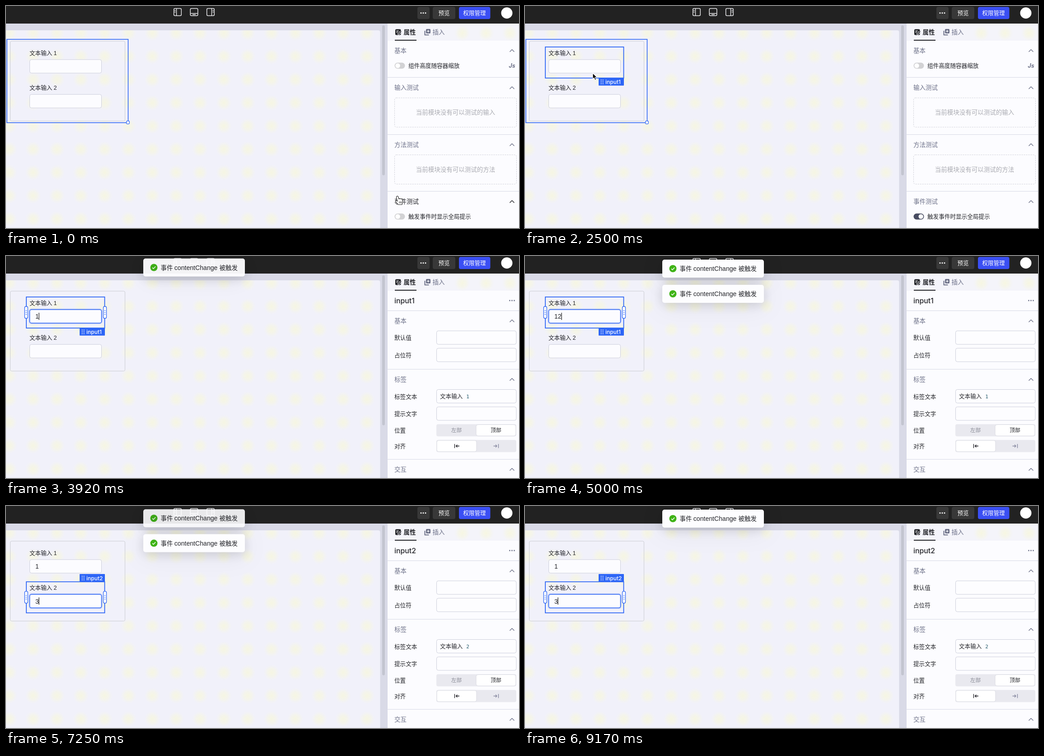
Write an HTML page that moves like this. It is 1136 px wide and 493 px high and loops after 9.33 s.

```html
<!DOCTYPE html>
<html lang="zh-CN">
<head>
<meta charset="utf-8">
<title>事件测试</title>
<style>
html, body { margin: 0; width: 100%; height: 100%; overflow: hidden; background: #d9dae7; }
svg { display: block; }
text { font-family: "Liberation Sans", "Noto Sans CJK SC", "Noto Sans CJK", sans-serif; white-space: pre; }
.ui { font-family: Inter, "Noto Sans CJK SC", "Noto Sans CJK", sans-serif; font-weight: 500; }
.mono { font-family: "DejaVu Sans Mono", "Noto Sans Mono", monospace; }
.toast { filter: drop-shadow(0 5px 12px #0002) drop-shadow(0 8px 26px #0001); }
</style>
</head>
<body>
<svg id="stage" width="1136" height="493" viewBox="0 0 1136 493"></svg>
<script>
const LOOP = 9330, STEP = 1000 / 12;
const BLUE = '#2e66f6', GREY = '#6d7189', INK = '#222328', LINE = '#d6d8e4', FIELD = '#cdcfdb';

// Markup helpers; text y is the vertical centre of the line.
const rect = (x, y, w, h, r, fill, stroke = 'none', more = '') =>
  `<rect x="${x}" y="${y}" width="${w}" height="${h}" rx="${r}" fill="${fill}" stroke="${stroke}" ${more}/>`;
const text = (x, y, size, fill, str, more = '') =>
  `<text x="${x}" y="${y + size * 0.37}" font-size="${size}" fill="${fill}" ${more}>${str}</text>`;
const path = (d, stroke, width = 1.4, fill = 'none', more = '') =>
  `<path d="${d}" stroke="${stroke}" stroke-width="${width}" fill="${fill}" stroke-linejoin="round" ${more}/>`;
const disc = (x, y, r, fill, more = '') => `<circle cx="${x}" cy="${y}" r="${r}" fill="${fill}" ${more}/>`;
const group = (id, body, more = '') => `<g id="${id}" ${more}>${body}</g>`;
const dots = (x, y, gap, r, fill) => [-gap, 0, gap].map(d => disc(x + d, y, r, fill)).join('');
const MID = 'text-anchor="middle"', MEDIUM = 'font-weight="500"';

const divider = y => rect(845, y, 291, 1, 0, LINE);
const heading = (y, str, color = GREY) =>
  text(860, y, 13.5, color, str, MEDIUM) + path(`M1115.5 ${y + 2.7}l5-5 5 5`, color);
const label = (x, y, str) => text(x, y, 12.6, INK, str);
const dashed = (y, str) =>
  rect(860.5, y, 270, 65, 4, 'none', '#d0d1d9', 'stroke-dasharray="3 2"') +
  text(995.5, y + 32.5, 13.5, '#aaabb2', str, MID);
const toggle = (y, id) =>
  rect(860.5, y - 6.5, 23, 13.5, 6.75, '#d2d2d4', 'none', `id="${id}Track"`) +
  disc(867.5, y + 0.2, 5.2, '#fff', `id="${id}Knob"`);
const field = (y, str) => label(860, y, str) + rect(953.5, y - 15.5, 176.5, 30, 4, '#fdfdff', FIELD);
const segment = (y, str, x) => label(860, y, str) + rect(953, y - 13.5, 177, 27, 4, '#e9e9ef') +
  rect(x, y - 12.5, 88, 25, 4, '#fff', '#d9dae2');

const layoutIcon = (x, split) =>
  rect(x - 8.3, 5.5, 16.6, 16, 2.5, 'none', '#e9e9ec', 'stroke-width="1.5"') + path(split, '#e9e9ec', 1.5);

function topBar() {
  return rect(0, 0, 1136, 39, 0, '#222') +
    layoutIcon(380, 'M377.5 5.5v16M373 10h2.5M373 13.5h2.5') +
    layoutIcon(416.5, 'M408.5 16.5h16M413 19h7') +
    layoutIcon(453, 'M455.5 5.5v16M457.5 10h2.5M457.5 13.5h2.5') +
    rect(911, 2, 27, 27, 4, '#383838') + dots(924, 15.5, 5, 1.5, '#fff') +
    rect(945, 2, 50, 27, 4, '#383838') + text(970, 15.5, 12.6, '#fff', '预览', MID) +
    rect(1003, 2, 69.5, 27, 4, '#3a4ff4') + text(1037.5, 15.5, 12.6, '#fff', '权限管理', MID) +
    disc(1109, 15.5, 12.5, '#fff');
}

function canvasArea() {
  return rect(0, 39, 845, 454, 0, '#d9dae7') +
    path('M0 54H824Q828.5 54 828.5 58V493H0Z', 'none', 0, '#f1f1fa') +
    path('M0 54H828V493H0Z', 'none', 0, 'url(#spots)') +
    rect(833, 43, 6, 333, 3, '#c3c5d0');
}

function tabs() {
  return rect(845, 39, 291, 454, 0, '#fcfcff') + rect(845, 39, 291, 38, 0, '#f4f4fa') +
    rect(985, 39, 151, 38, 0, 'url(#spots)') +
    rect(862, 51.5, 12.5, 13, 2.5, INK) + path('M864.5 55.5h5M864.5 58.5h3', '#fff', 1.3) +
    path('M868 63.5l6.5-6.5', '#f4f4fa', 4) + path('M868.5 63l6.5-6.5', INK, 2) +
    text(880.5, 58, 13.5, INK, '属性', 'font-weight="700"') + rect(861, 75, 48, 2, 0, INK) +
    path('M927.5 55v9.2h9', GREY, 2) + rect(930, 51, 10, 10, 2, GREY) +
    path('M935 53.3v5.4M932.3 56h5.4', '#fff', 1.3) + text(944.5, 58, 13.5, GREY, '插入', MEDIUM);
}

function modulePanel() {
  return heading(99, '基本') + toggle(132.3, 'fit') + label(891, 132.3, '组件高度随容器缩放') +
    text(1113.5, 132, 12.5, GREY, 'Js', 'class="ui" font-style="italic" style="font-weight:700"') +
    divider(158) + heading(181.5, '输入测试') + dashed(204, '当前模块没有可以测试的输入') +
    divider(285) + heading(308, '方法测试') + dashed(330.5, '当前模块没有可以测试的方法') +
    divider(411) + group('eventOff', heading(434.3, '事件测试')) +
    group('eventOn', heading(434.3, '事件测试', INK)) +
    toggle(467.3, 'tip') + label(891, 467.3, '触发事件时显示全局提示');
}

function inputPanel() {
  return text(860, 99.5, 15.8, INK, '', 'class="ui" id="title"') + dots(1120.5, 99, 5, 1.4, GREY) +
    divider(121) + heading(144, '基本') + field(181.7, '默认值') + field(220.3, '占位符') +
    divider(251) + heading(274, '标签') + field(312, '标签文本') + label(961, 311.5, '文本输入') +
    text(1019.3, 312, 11, '#20586a', '', 'class="mono" id="labelNo"') + field(350.5, '提示文字') +
    segment(387, '位置', 1041) + text(997.5, 387, 11.8, '#8b8d98', '左部', MID) +
    text(1085, 387, 11.8, INK, '顶部', MID + ' ' + MEDIUM) + segment(422, '对齐', 954) +
    path('M993.5 417.5v9M1004 422h-7.5m3-3l-3 3 3 3', INK) +
    path('M1090.5 417.5v9M1079.5 422h7.5m-3-3l3 3-3 3', '#8688a0') +
    divider(451) + group('actOff', heading(473.7, '交互')) + group('actOn', heading(473.7, '交互', INK));
}

// One form input with its focus ring, hover frame, name tag and side handles.
function formInput(n, y) {
  return text(52, y - 29.7, 12.6, INK, '文本输入') + text(105.6, y - 29.7, 12.6, INK, n) +
    rect(52.5, y - 15, 159, 30, 4, '#fcfcff', FIELD) +
    group('focus' + n, rect(51.5, y - 16, 161, 32, 5, 'none', '#2e66f633', 'stroke-width="3"') +
      rect(52.5, y - 15, 159, 30, 4, '#fcfcff', BLUE, 'stroke-width="1.5"')) +
    text(65, y + 0.2, 13.8, INK, '', `id="value${n}"`);
}
function inputFrame(n, y, tagY) {
  const grip = [0, 1, 2].map(i => disc(168.7, tagY + 5 + i * 4, 1, '#fff') + disc(172.7, tagY + 5 + i * 4, 1, '#fff')).join('');
  const handle = x => rect(x, y - 22, 7, 26.5, 3, '#fff', BLUE, 'stroke-width="1.3"') +
    path(`M${x + 2} ${y - 12.5}h3m-3 4h3m-3 4h3`, BLUE, 1.1);
  return group('frame' + n, rect(45, y - 43, 173.5, 69, 0, 'none', BLUE, 'stroke-width="1.8"') +
    rect(163, tagY, 56, 17.3, 1, BLUE) + grip +
    text(178, tagY + 9.2, 12, '#fff', 'input' + n, 'class="ui"')) +
    group('handles' + n, handle(41.3) + handle(215.5));
}

function toast(i) {
  return group('toast' + i, rect(304, 0, 225, 40, 5, '#fdfdff') + disc(327.5, 20, 8, '#3fb317') +
    path('M324 20.2l2.5 2.5 4.6-5', '#fff', 1.5) + text(342.5, 20, 13.5, INK, '事件') +
    text(372.8, 20, 14.1, INK, 'contentChange') + text(472.6, 20, 13.5, INK, '被触发'), 'class="toast"');
}

const toasts = [[3750, 6790], [4060, 7165], [5500, 8500], [7250, Infinity]];

stage.innerHTML = `<defs>
  <radialGradient id="spot"><stop offset="0" stop-color="#f6f6de" stop-opacity=".85"/>
  <stop offset=".5" stop-color="#f6f6e2" stop-opacity=".6"/><stop offset="1" stop-color="#f5f5ee" stop-opacity="0"/></radialGradient>
  <pattern id="spots" x="33.6" y="189.2" width="52.8" height="51.6" patternUnits="userSpaceOnUse">
  ${disc(26.4, 25.8, 18, 'url(#spot)')}</pattern></defs>` +
  canvasArea() + rect(9.5, 78, 254, 177.5, 3, 'none', '#cbccd2') +
  formInput(1, 134) + formInput(2, 211.3) +
  group('module', rect(2, 74, 268.5, 185.2, 0, 'none', BLUE, 'stroke-width="1.6"') +
    rect(266.7, 255.3, 6.5, 6.5, 1.5, '#fff', BLUE, 'stroke-width="1.3"')) +
  inputFrame(1, 134, 159.5) + inputFrame(2, 211.3, 151) +
  rect(0, 0, 1.2, 16, 0, '#111', 'none', 'id="caret"') +
  tabs() + group('panelModule', modulePanel()) + group('panelInput', inputPanel()) +
  topBar() + toasts.map((_, i) => toast(i)).join('') +
  group('cursor',
    group('hand', path('M-2 0Q0-2 1.3 0L3 5.5Q4.5 4 6 5.2 7.5 4.2 8.7 5.7 10.5 5.3 11 7.5L11.5 12 10 18H1.5L-4.5 11Q-5.5 8.5-3 8.7L-.3 10.5-2.7 2Z', '#222', 1.1, '#fff') +
      path('M4 11v4M6.3 11v4M8.5 11v4', '#222', 0.9)) +
    group('arrow', path('M0 0V13.2L3 10.4 5.3 15.6 7.7 14.5 5.4 9.5H9.5Z', '#fff', 1.1, '#000')) +
    group('beam', path('M-3-6.5Q0-6.5 0-4.5 0-6.5 3-6.5M0-5V6M-3 7.5Q0 7.5 0 5.5 0 7.5 3 7.5M-1.5 2h3', '#111', 1.2)));

const $ = id => document.getElementById(id);
const show = (id, on) => $(id).style.display = on ? '' : 'none';
const within = (t, a, b) => t >= a && t < b;
const clamp = v => Math.max(0, Math.min(1, v));
const mix = (a, b, p) => a + (b - a) * p;
const easeOut = p => 1 - (1 - p) ** 4;
const easeInOut = p => p < 0.5 ? 4 * p ** 3 : 1 - 4 * (1 - p) ** 3;
const latest = (list, t) => list.findLast(e => t >= e[0]) || [];

// time, x, centre y; an entry without a place hides the caret
const carets = [[3000, 65, 134], [3500], [3750, 73, 134], [4000, 81, 134], [4500], [5000, 81, 134],
  [5500, 73, 134], [6000], [6660, 65, 211], [7160, 73, 211], [7660], [8160, 73, 211], [8660], [9160, 73, 211]];
const values1 = [[0, ''], [3750, '1'], [4000, '12'], [5500, '1']];
const track = [[0, 867, 423], [83, 872, 441], [250, 874, 460], [417, 875, 463], [917, 875, 463], [1833, 356, 236],
  [2000, 356, 236], [2500, 150, 149], [2833, 136, 134], [6080, 136, 134], [6500, 134, 200], [6750, 134, 207],
  [7750, 134, 207], [8000, 553, 230], [8167, 598, 236], [8333, 598, 236], [8833, 875, 460], [9330, 875, 460]];

function moveCursor(t) {
  show('cursor', t < 3750 || within(t, 6160, 7160) || within(t, 7825, 8910));
  const kind = t < 1000 || t >= 8750 ? 'hand' : within(t, 2660, 7160) ? 'beam' : 'arrow';
  for (const k of ['hand', 'arrow', 'beam']) show(k, k === kind);
  const i = track.findIndex(p => p[0] > t), a = track[i - 1], b = track[i];
  let p = (t - a[0]) / (b[0] - a[0]);
  p = p * p * (3 - 2 * p);
  $('cursor').setAttribute('transform', `translate(${mix(a[1], b[1], p)} ${mix(a[2], b[2], p)})`);
}

function stackToasts(t) {
  let y = 0;
  toasts.forEach(([start, end], i) => {
    const e = easeOut(clamp((t - start) / 300)), left = 1 - easeInOut(clamp((t - end) / 300));
    const alive = t > start && left > 0;
    show('toast' + i, alive);
    if (!alive) return;
    const pad = 8 * e * left;
    $('toast' + i).setAttribute('transform', `translate(0 ${y + pad - 56 * (1 - e)})`);
    $('toast' + i).style.opacity = e * left;
    y += Math.min(40 + 2 * pad, 150 * left);
  });
}

function draw(t) {
  const picked = t < 3000 ? 0 : t < 6660 ? 1 : 2;
  show('module', !picked);
  show('panelModule', !picked);
  show('panelInput', picked);
  for (const n of [1, 2]) {
    show('focus' + n, picked === n);
    show('handles' + n, picked === n);
  }
  show('frame1', within(t, 2410, 6660));
  show('frame2', t >= 6330);
  show('eventOn', t < 250);
  show('eventOff', t >= 250);
  const overAction = within(t, 8750, 8910);
  show('actOn', overAction);
  show('actOff', !overAction);
  $('title').textContent = 'input' + picked;
  $('labelNo').textContent = picked;
  $('value1').textContent = latest(values1, t)[1];
  $('value2').textContent = t >= 7160 ? '3' : '';

  const on = clamp((t - 334) / 249);
  $('tipKnob').setAttribute('cx', mix(867.5, 876.7, on));
  $('tipTrack').setAttribute('fill', `rgb(${mix(210, 72, on)},${mix(210, 76, on)},${mix(212, 98, on)})`);

  const [, x, y] = latest(carets, t);
  show('caret', x);
  if (x) $('caret').setAttribute('transform', `translate(${x - 0.6} ${y - 8})`);
  moveCursor(t);
  stackToasts(t);
}

const begin = performance.now();
function tick() {
  const time = (performance.now() - begin) % LOOP;
  draw(Math.min(Math.round(Math.floor((time + 4) / STEP) * STEP), LOOP - 1));
  requestAnimationFrame(tick);
}
tick();
</script>
</body>
</html>
```
